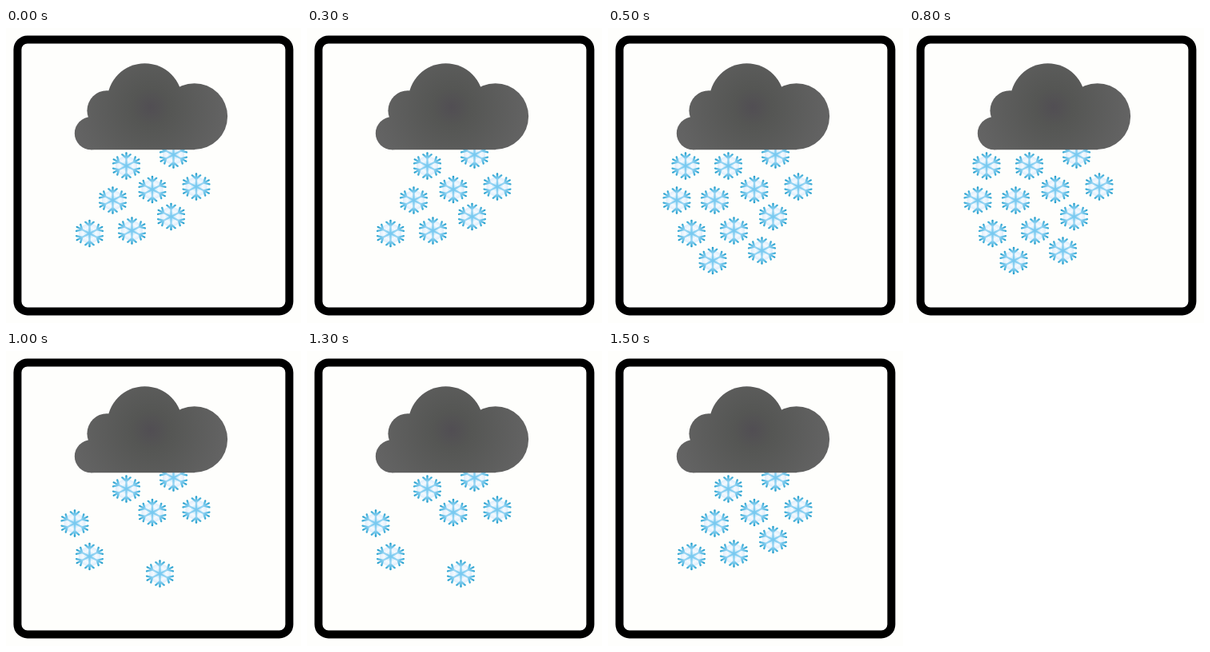
Recreate the animation shown at these times as an HTML page. Size 369 by 369 pixels, loop 2000 ms.

```html
<!DOCTYPE html>
<html lang="en">
<head>
<meta charset="utf-8">
<title>Snow cloud</title>
<style>
  html, body { margin: 0; width: 100%; height: 100%; overflow: hidden; background: #fefefc; }
  svg { display: block; width: 369px; height: 369px; }
</style>
</head>
<body>
<svg viewBox="0 0 369 369">
  <defs>
    <radialGradient id="sky" gradientUnits="userSpaceOnUse" cx="181" cy="99" r="95">
      <stop offset="0" stop-color="#514e53"/>
      <stop offset=".25" stop-color="#555654"/>
      <stop offset="1" stop-color="#636363"/>
    </radialGradient>
    <radialGradient id="ice" gradientUnits="userSpaceOnUse" cx="0" cy="0" r="17">
      <stop offset="0" stop-color="#74c8f0"/>
      <stop offset=".5" stop-color="#9bd6f4"/>
      <stop offset=".75" stop-color="#62bfe6"/>
      <stop offset="1" stop-color="#1797c6"/>
    </radialGradient>
    <radialGradient id="frost" gradientUnits="userSpaceOnUse" cx="0" cy="0" r="14">
      <stop offset="0" stop-color="#a5dbf7"/>
      <stop offset=".5" stop-color="#f6fafe"/>
      <stop offset="1" stop-color="#d6e9fa"/>
    </radialGradient>
    <path id="arm" d="M0 0V-16.2M-4.6 -14.2L0 -9.6L4.6 -14.2"/>
    <g id="flake" transform="scale(1.12 1)" fill="none" stroke="url(#ice)" stroke-width="2.2" stroke-linecap="round">
      <path d="M0 -14L12.1 -7V7L0 14L-12.1 7V-7Z" fill="url(#frost)" stroke="none"/>
    </g>
  </defs>
  <g id="snow"></g>
  <g fill="url(#sky)">
    <circle cx="106.4" cy="131.7" r="20.6"/>
    <circle cx="126.4" cy="103.2" r="25"/>
    <circle cx="173.6" cy="91.2" r="47"/>
    <circle cx="235.7" cy="110.6" r="41.4"/>
    <path d="M106 152.2V105H236V152.2Z"/>
  </g>
  <rect x="14.4" y="14.4" width="340" height="340" rx="12.5" fill="none" stroke="#000" stroke-width="10"/>
</svg>
<script>
  const STEP = 500, STEPS = 4;
  // x, y, and which of the four steps show the flake
  const flakes = [
    [150.5, 172.5, "1111"], [209.5, 158.5, "1111"], [183, 202, "1111"],
    [238, 198.5, "1111"], [104.5, 257, "1111"],
    [133.5, 215.5, "1101"], [157.5, 253.5, "1101"], [206.5, 236, "1101"],
    [86, 215.5, "0110"], [192.5, 278.5, "0110"],
    [97, 172.5, "0100"], [131, 291, "0100"]
  ];

  function addUse(parent, id, transform) {
    const use = document.createElementNS("http://www.w3.org/2000/svg", "use");
    use.setAttribute("href", id);
    use.setAttribute("transform", transform);
    return parent.appendChild(use);
  }

  const flake = document.getElementById("flake");
  for (let angle = 0; angle < 360; angle += 60) addUse(flake, "#arm", `rotate(${angle})`);

  const snow = document.getElementById("snow");
  const nodes = flakes.map(([x, y]) => addUse(snow, "#flake", `translate(${x} ${y})`));

  const start = performance.now();
  function draw() {
    const step = Math.floor((performance.now() - start) / STEP) % STEPS;
    flakes.forEach(([, , shown], i) => {
      nodes[i].style.display = shown[step] === "1" ? "" : "none";
    });
    requestAnimationFrame(draw);
  }
  draw();
</script>
</body>
</html>
```
